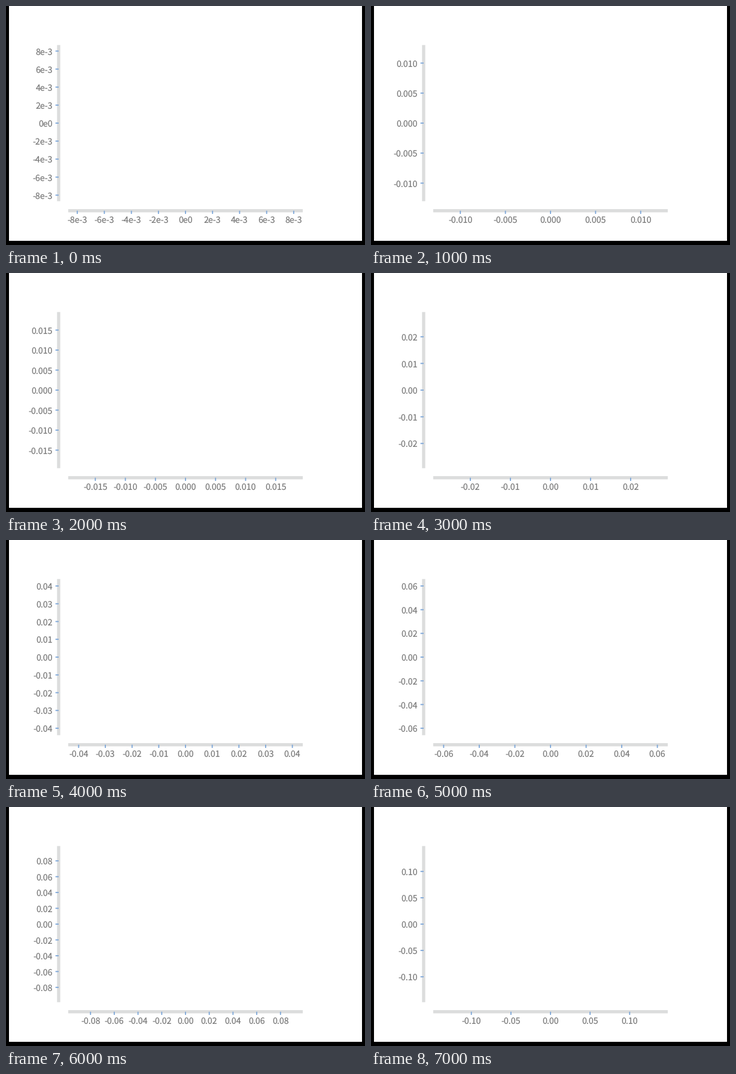
A matplotlib script that plays this animation: 600 px wide and 400 px high, repeating every 8000 ms.

```python
import math

import matplotlib.pyplot as plt
from matplotlib.animation import FuncAnimation
from matplotlib.patches import Rectangle

W, H, DPI = 600, 400, 100
CX, CY = 300, 196              # screen position of the value zero
HALF_W, HALF_H = 196, 392 / 3  # half lengths of the two axes
AXIS_X, AXIS_Y = 88, 342.67    # centre lines of the axis bars
BAR, TICK_LEN, TICK_W = 5.33, 5.33, 1.8
STEPS = 8

GREY, BLUE, INK = "#dcdddd", "#7ca6d8", "#7c7c7c"
FONT_PX = 14.2

plt.rcParams["text.hinting"] = "none"

fig = plt.figure(figsize=(W / DPI, H / DPI), dpi=DPI, facecolor="black")
ax = fig.add_axes([0, 0, 1, 1])


def rect(x0, y0, x1, y1, color):
    ax.add_patch(Rectangle((x0, y0), x1 - x0, y1 - y0, fc=color, lw=0, snap=False))


def label(x, y, text, align):
    ax.text(x, y, text, ha=align, va="baseline", color=INK,
            family="Noto Sans CJK JP", fontsize=FONT_PX * 72 / DPI)


def nice_step(span):
    """Smallest step of 1, 2 or 5 times a power of ten giving at most ten intervals."""
    raw = span / 10
    power = math.floor(math.log10(raw))
    for m in (1, 2, 5, 10):
        if m * 10.0 ** power >= raw:
            return m * 10.0 ** power


def tick_text(value, step, half):
    if half < 0.01:
        power = math.floor(math.log10(abs(value)) + 1e-9) if value else 0
        return f"{round(value / 10 ** power)}e{power}"
    digits = -math.floor(math.log10(step) + 1e-9)
    return f"{value:.{digits}f}"


def draw(i):
    ax.clear()
    ax.set_xlim(0, W)
    ax.set_ylim(H, 0)
    ax.axis("off")

    rect(5, 0, 595, 393, "white")
    rect(AXIS_X - BAR / 2, CY - HALF_H, AXIS_X + BAR / 2, CY + HALF_H, GREY)
    rect(CX - HALF_W, AXIS_Y - BAR / 2, CX + HALF_W, AXIS_Y + BAR / 2, GREY)

    # The visible range grows by half at every step.
    half = 0.5 * (2 / 3) ** (10 - i)
    step = nice_step(2 * half)
    count = int(half / step)
    for k in range(-count, count + 1):
        value = k * step
        text = tick_text(value, step, half)
        x = CX + value / half * HALF_W
        y = CY - value / half * HALF_H
        rect(x - TICK_W / 2, AXIS_Y, x + TICK_W / 2, AXIS_Y + TICK_LEN, BLUE)
        rect(AXIS_X - TICK_LEN, y - TICK_W / 2, AXIS_X, y + TICK_W / 2, BLUE)
        label(x, 364, text, "center")
        label(78.3, y + 7, text, "right")
    return []


anim = FuncAnimation(fig, draw, frames=STEPS, interval=1000, repeat=True,
                     repeat_delay=0, blit=False)
plt.show()
```
